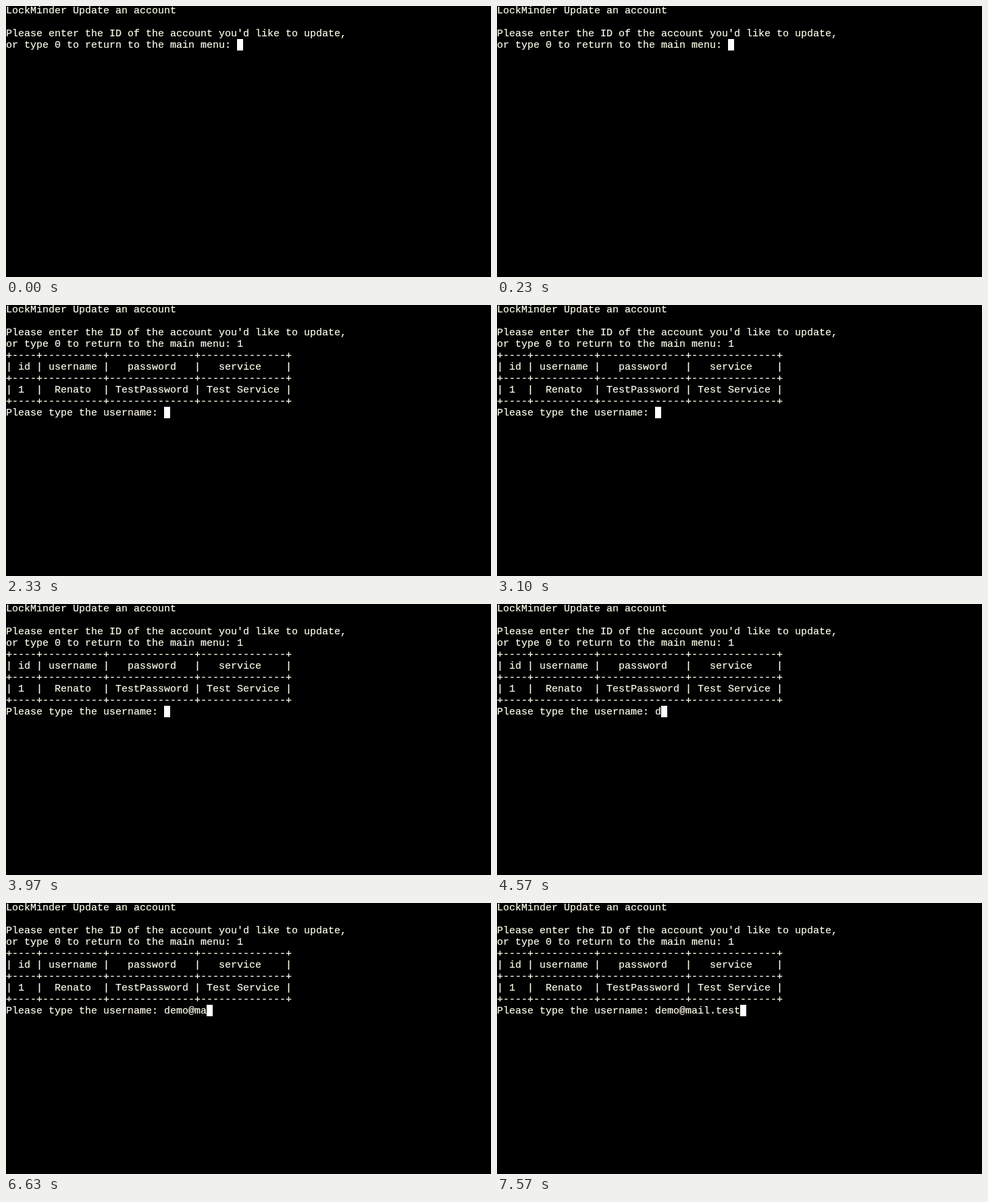
Write an HTML page that moves like this. It is 718 px wide and 402 px high and loops after 8 s.

```html
<!DOCTYPE html>
<html lang="en">
<head>
<meta charset="utf-8">
<title>Account update terminal</title>
<style>
  html, body { margin: 0; width: 100%; height: 100%; overflow: hidden; background: #000; }
  svg { display: block; width: 718px; height: 402px; }
  text {
    font: 15px "Liberation Mono", "Courier New", monospace;
    white-space: pre;
    fill: #fffdec;
    stroke: #fffdec;
    stroke-width: .2px;
  }
</style>
</head>
<body>
<svg id="screen" viewBox="0 0 718 402"></svg>
<script>
const LOOP = 8000, CELL = 9, ROW = 17, TABLE_AT = 2330;
const NS = "http://www.w3.org/2000/svg";
const screen = document.getElementById("screen");

const rule = [4, 10, 14, 14].map(n => "+" + "-".repeat(n)).join("") + "+";
const idPrompt = "or type 0 to return to the main menu: ";
const namePrompt = "Please type the username: ";
const header = [
  "LockMinder Update an account",
  "",
  "Please enter the ID of the account you'd like to update,"
];
const table = [
  rule,
  "| id | username |   password   |   service    |",
  rule,
  "| 1  |  Renato  | TestPassword | Test Service |",
  rule
];

// Typed text with the time of each key
const idKeys = { text: "1", times: [1130] };
const nameKeys = {
  text: "demo@mail.test",
  times: [4530, 4600, 4870, 5100, 6000, 6430, 6630, 6730, 6830, 7030,
          7270, 7370, 7470, 7540]
};

function add(tag, attrs) {
  const el = document.createElementNS(NS, tag);
  for (const k in attrs) el.setAttribute(k, attrs[k]);
  return screen.appendChild(el);
}

function line(row, str = "") {
  const el = add("text", { x: 0, y: row * ROW + 11 });
  el.textContent = str;
  return el;
}

const typed = (keys, t) => keys.text.slice(0, keys.times.filter(k => k <= t).length);

header.forEach((s, i) => line(i, s));
const idLine = line(3);
const tableLines = table.map((s, i) => line(4 + i, s));
const nameLine = line(9);
const cursor = add("rect", { width: CELL, height: ROW, fill: "#fff" });

function draw(t) {
  const open = t >= TABLE_AT;
  const idText = idPrompt + typed(idKeys, t);
  const nameText = open ? namePrompt + typed(nameKeys, t) : "";
  idLine.textContent = idText;
  nameLine.textContent = nameText;
  for (const el of tableLines) el.setAttribute("visibility", open ? "visible" : "hidden");
  cursor.setAttribute("x", (open ? nameText : idText).length * CELL);
  cursor.setAttribute("y", (open ? 9 : 3) * ROW - 2);
}

const start = performance.now();
function tick() {
  draw((performance.now() - start) % LOOP);
  requestAnimationFrame(tick);
}
tick();
</script>
</body>
</html>
```
